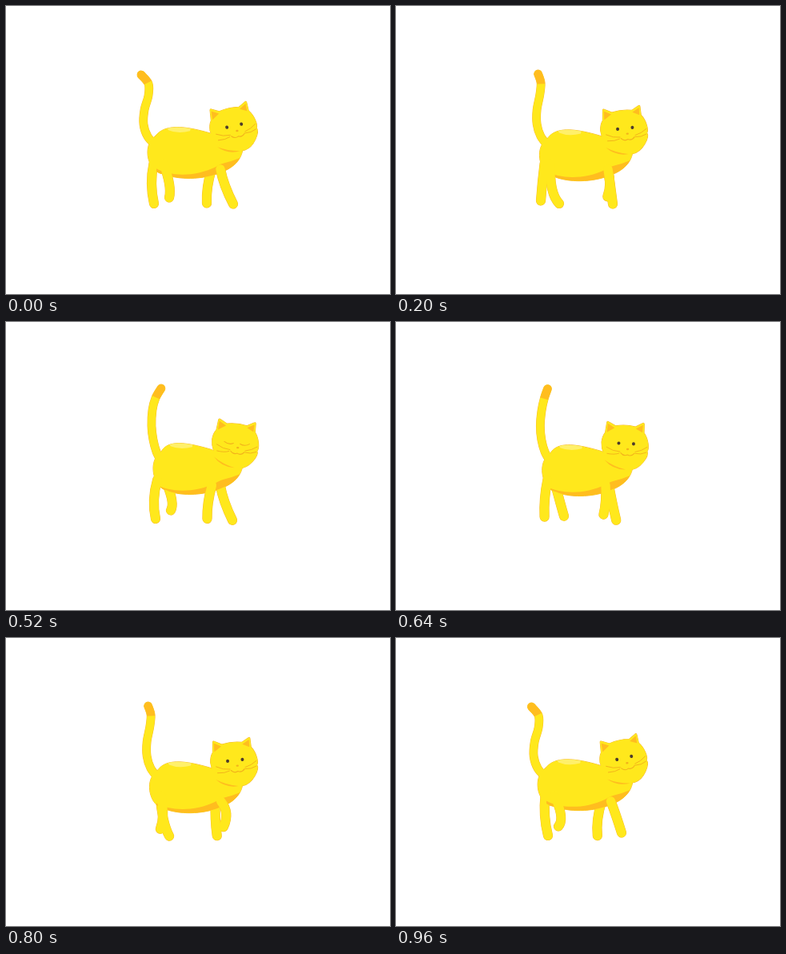
These frames come from a looping animation (480x360 px, 1000 ms). An HTML page with a canvas:

```html
<!DOCTYPE html>
<html lang="en">
<head>
<meta charset="utf-8">
<title>Walking cat</title>
<style>
html, body { margin: 0; width: 100%; height: 100%; overflow: hidden; background: #fff; }
canvas { display: block; }
</style>
</head>
<body>
<canvas id="stage" width="480" height="360"></canvas>
<script>
const ctx = document.getElementById('stage').getContext('2d');
const LOOP = 1000, STEP = 40;
const FUR = '#ffe81c', SHADE = '#ffbd1f', LINE = '#f2b21c', EDGE = '#f5b62a', EYE = '#4d3b2c';

// Leg poses: [time, knee x, knee y, foot x, foot y]
const REAR_NEAR = [
  [0, 204, 222, 204, 239.5], [200, 195, 228, 204, 247], [360, 190, 225, 194, 247],
  [520, 185, 222, 187, 246], [720, 189, 220, 187, 241.5], [880, 204, 221, 200, 236], [960, 206, 221, 203, 235.5]
];
const REAR_FAR = [
  [0, 182, 222, 185, 247], [200, 183, 220, 181, 243.5], [360, 199, 221, 198, 234],
  [520, 207, 221, 206, 235.5], [720, 202, 228, 210, 247], [880, 191, 225, 196, 247], [960, 186, 222, 190, 247]
];
const FRONT = [
  [0, 274, 225, 284, 247.5], [200, 268, 225, 271, 247.5], [360, 258, 226, 259.5, 247],
  [500, 252, 226, 251, 246.5], [710, 268, 222, 265, 238], [870, 279, 218, 277, 236.5], [960, 275, 222, 282, 243.5]
];

// Tail points, tip to base, at both ends of its swing
const TAIL_LEFT = [[169, 86], [178, 97], [178, 112], [173, 130], [172, 148], [177, 163], [187, 174]];
const TAIL_RIGHT = [[194, 83], [187, 95], [183, 110], [182, 130], [184, 147], [188, 162], [194, 174]];

// Smooth periodic interpolation through timed poses
function pose(keys, time) {
  const n = keys.length;
  const t = ((time % LOOP) + LOOP) % LOOP;
  let i = n - 1;
  while (keys[i][0] > t) i--;
  const key = j => keys[(j + n) % n];
  const at = j => key(j)[0] + LOOP * Math.floor(j / n);
  const span = at(i + 1) - at(i);
  const u = (t - at(i)) / span;
  const slope = (j, c) => (key(j + 1)[c] - key(j - 1)[c]) / (at(j + 1) - at(j - 1)) * span;
  return [1, 2, 3, 4].map(c => {
    const a = key(i)[c], b = key(i + 1)[c];
    const ma = slope(i, c), mb = slope(i + 1, c);
    const d = b - a;
    return a + u * (ma + u * (3 * d - 2 * ma - mb + u * (ma + mb - 2 * d)));
  });
}

function legPath(keys, time, rootX, rootY) {
  const [kx, ky, fx, fy] = pose(keys, time);
  const hx = (rootX + kx) / 2;
  const p = new Path2D();
  p.moveTo(hx, rootY);
  p.quadraticCurveTo(2 * kx - (hx + fx) / 2, 2 * ky - (rootY + fy) / 2, fx, fy);
  return p;
}

function splinePath(pts) {
  const p = new Path2D();
  const at = i => pts[Math.max(0, Math.min(pts.length - 1, i))];
  p.moveTo(...pts[0]);
  for (let i = 0; i < pts.length - 1; i++) {
    const [a, b, c, d] = [at(i - 1), at(i), at(i + 1), at(i + 2)];
    p.bezierCurveTo(b[0] + (c[0] - a[0]) / 6, b[1] + (c[1] - a[1]) / 6,
                    c[0] - (d[0] - b[0]) / 6, c[1] - (d[1] - b[1]) / 6, c[0], c[1]);
  }
  return p;
}

function bodyPath(dx, bob) {
  const p = new Path2D(), y = v => v + bob;
  p.moveTo(187 + dx, y(164));
  p.bezierCurveTo(198 + dx * 0.5, y(149.5), 222, y(151), 256, y(161));
  p.lineTo(296, y(178));
  p.bezierCurveTo(296, y(190), 288, y(203), 268, y(210));
  p.bezierCurveTo(245, y(219.5), 215, y(219), 197 + dx * 0.5, y(212));
  p.bezierCurveTo(183 + dx, y(210), 177 + dx, y(196), 177 + dx, y(185));
  p.bezierCurveTo(177 + dx, y(176), 180 + dx, y(169), 187 + dx, y(164));
  p.closePath();
  return p;
}

const HEAD = new Path2D('M-29.5-10C-29-16-27-20-25.5-22L-24-35Q-23.5-37-21.5-35.5L-13-31Q0-33.5 12-31' +
  'L20.5-35.5Q22.5-37 22.8-34.5L23-24C29-16 30.5-4 28-1C31 5 20 22 8 23C-10 24-29 12-29.5-10Z');
const CHIN = new Path2D('M-25 12Q-14 24 2 23Q-13 20-25 12Z');
const EARS = new Path2D('M-22.8-33.5L-14-28.5L-23.5-22.5ZM21.3-33.5L12.5-28.5L21-24Z');
const WHISKERS = new Path2D('M-23-4Q-15 1-6 1M-22 4Q-13 5.5-7 3M13 .5Q21-1 27.5-6M13 2.5Q20 4 27 .5');
const MOUTH = new Path2D('M-5 2.5Q-1 7 3.5 4.5Q8 7 12 2.5');
const LIDS = new Path2D('M-14-8.5Q-8-4.5-2.5-7.5M6-7.5Q12-4.5 17.5-8.5');

function fill(path, color) {
  ctx.fillStyle = color;
  ctx.fill(path);
}

function stroke(path, color, width) {
  ctx.strokeStyle = color;
  ctx.lineWidth = width;
  ctx.stroke(path);
}

function inHead(turn, bob, paint) {
  ctx.save();
  ctx.translate(286, 161 + bob);
  ctx.rotate(turn);
  paint();
  ctx.restore();
}

function drawFace(t) {
  fill(CHIN, SHADE);
  fill(EARS, SHADE);
  stroke(WHISKERS, LINE, 0.9);
  stroke(MOUTH, LINE, 1.1);
  ctx.fillStyle = LINE;
  ctx.beginPath();
  ctx.ellipse(3.5, -2.5, 1.7, 1.2, 0, 0, Math.PI * 2);
  ctx.fill();

  const open = Math.min(1, Math.max(0, (Math.abs(t - 520) - 40) / 60));
  if (open < 0.2) {
    stroke(LIDS, LINE, 1.1);
    return;
  }
  ctx.fillStyle = EYE;
  for (const x of [-8, 10.5]) {
    ctx.beginPath();
    ctx.ellipse(x, -9.5, 2, 2.1 * open, 0, 0, Math.PI * 2);
    ctx.fill();
  }
}

function drawShading(body, dx, bob) {
  ctx.save();
  ctx.clip(body);
  ctx.translate(0, bob);
  const belly = new Path2D('M188 205C205 214.5 235 216 262 203C270 197 285 197 297 189V228H188Z');
  fill(belly, SHADE);
  const x = 203 + dx * 0.4;
  fill(new Path2D(`M${x - 4} 150L${x} 157Q${x + 12} 162 ${x + 27} 158L${x + 29} 150Z`), '#fff06a');
  ctx.restore();
}

function draw(t) {
  const turn = 2 * Math.PI * t / LOOP;
  const sway = (1 - Math.cos(turn)) / 2;
  const bob = -1.8 * Math.cos(2 * turn);
  const dx = 7 * sway;
  const tilt = (-12.5 + 18.5 * sway) * Math.PI / 180;

  const tailPts = TAIL_LEFT.map((p, i) => p.map((v, c) => v + (TAIL_RIGHT[i][c] - v) * sway));
  const tail = splinePath(tailPts);
  const body = bodyPath(dx, bob);
  const half = t + LOOP / 2;
  const farLegs = [legPath(REAR_FAR, t, 187 + dx * 0.5, 197), legPath(FRONT, half, 262, 204)];
  const nearLegs = [legPath(REAR_NEAR, t, 190 + dx * 0.5, 197), legPath(FRONT, t, 262, 204)];
  const legs = [...farLegs, ...nearLegs];

  ctx.fillStyle = '#fff';
  ctx.fillRect(0, 0, 480, 360);
  ctx.lineCap = ctx.lineJoin = 'round';

  // Thin rim around the whole silhouette
  stroke(tail, EDGE, 10.8);
  legs.forEach(p => stroke(p, EDGE, 12.2));
  stroke(body, EDGE, 1);
  inHead(tilt, bob, () => stroke(HEAD, EDGE, 1));

  stroke(tail, FUR, 10);
  ctx.save();
  ctx.lineCap = 'butt';
  ctx.setLineDash([13, 999]);
  stroke(tail, SHADE, 10);
  ctx.restore();
  ctx.fillStyle = SHADE;
  ctx.beginPath();
  ctx.arc(tailPts[0][0], tailPts[0][1], 5, 0, Math.PI * 2);
  ctx.fill();

  farLegs.forEach(p => stroke(p, FUR, 11.4));
  fill(body, FUR);
  drawShading(body, dx, bob);
  nearLegs.forEach(p => stroke(p, FUR, 11.4));
  inHead(tilt, bob, () => {
    fill(HEAD, FUR);
    drawFace(t);
  });
}

function tick() {
  const t = performance.now() % LOOP;
  draw(Math.floor(t / STEP) * STEP);
  requestAnimationFrame(tick);
}
tick();
</script>
</body>
</html>
```
